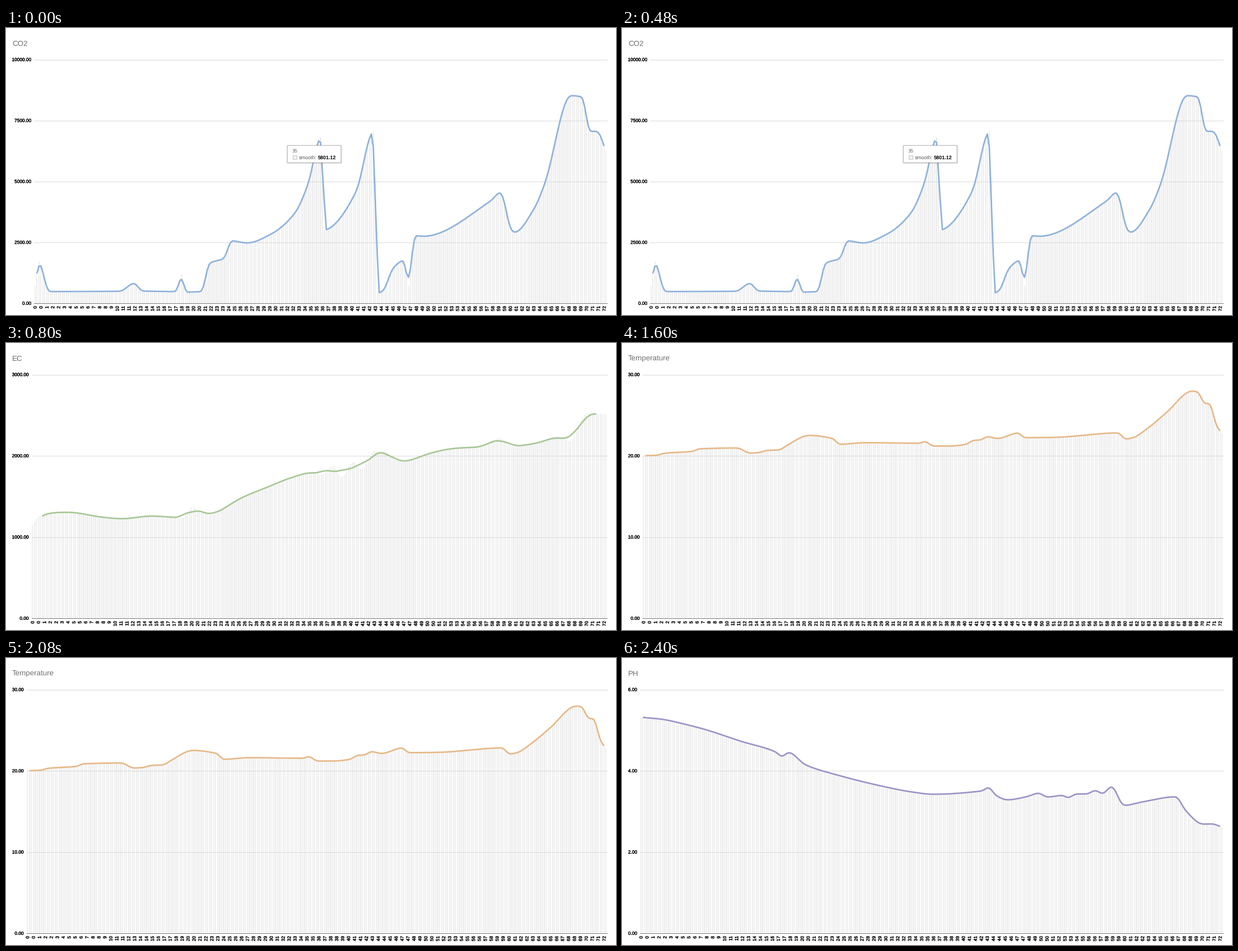
A matplotlib script for the animation above (3200 ms loop, 1089 by 514 pixels).

```python
import numpy as np
import matplotlib.pyplot as plt
from matplotlib.animation import FuncAnimation
from matplotlib.collections import PolyCollection
from matplotlib.patches import FancyBboxPatch, Rectangle
from matplotlib.patheffects import withStroke

W, H, DPI = 1089, 514, 64
PT = 72 / DPI  # points per pixel
TOP, BASE, RIGHT = 56.5, 493, 1073
BARS = 293

plt.rcParams["font.family"] = "Liberation Sans"
plt.rcParams["text.hinting"] = "no_hinting"

# Turning points of each measured series, in stage pixels.
CO2 = [
    (52, 463), (59, 418), (64, 430), (76, 472), (203, 471.5), (229, 457),
    (243, 471), (305, 472), (313, 440), (320, 473), (350, 472), (362, 422),
    (390, 412), (402, 381), (430, 385), (475, 368), (516, 331), (540, 277),
    (561.4, 196), (564.9, 217), (568.4, 362), (577, 359), (625, 293),
    (655.7, 185), (659.2, 265), (662.7, 475), (673, 471), (691, 430),
    (711, 416), (718.5, 461), (729, 372), (745, 373), (865, 310), (883, 294),
    (903, 364), (908, 366), (942, 325), (962, 278), (1008, 121), (1030, 124),
    (1041, 185), (1056, 185), (1071, 221),
]
EC = [
    (47, 325), (58, 311), (80, 304), (122, 303), (150, 309), (212, 315),
    (255, 309.5), (316, 313), (333, 294), (350, 305), (368, 307), (388, 297),
    (418, 278), (447, 266), (545, 232), (600, 228), (640, 216), (660, 196),
    (676, 194), (695, 210), (712, 213), (745, 201), (800, 188.5), (850, 186),
    (882, 170), (902, 185), (960, 176.5), (985, 167), (1007, 175),
    (1034, 129), (1045, 126), (1071, 128),
]
TEMPERATURE = [
    (37, 202), (62, 201), (75, 197.5), (127, 194), (137, 189.5), (206, 188),
    (228, 197), (246, 196), (257, 192.5), (281, 191.5), (291, 185.5),
    (334, 165.5), (378, 171.5), (387, 181.5), (435, 178.5), (532, 179.5),
    (540, 176), (556, 184.5), (585, 184.5), (616, 181), (626, 174.5),
    (641, 173.5), (652, 167.5), (670, 171), (708, 161), (718, 169.5),
    (770, 169), (887, 161), (898, 172), (911, 170), (940, 151.5),
    (972, 124.5), (1018, 86), (1029, 88), (1040, 109), (1050, 108),
    (1060, 146), (1071, 162),
]
PH = [
    (33, 106), (70, 109.5), (110, 118), (150, 128.5), (212, 149), (276, 169),
    (285, 177), (297, 169), (328, 191.5), (386, 210), (453, 227),
    (515, 239.5), (555, 244), (643, 238), (654, 231.5), (668, 246.5),
    (688, 254), (722, 248.5), (744, 242), (759, 249), (787, 246),
    (796, 250.5), (811, 243.5), (830, 243.5), (845, 237), (858, 243),
    (874, 230), (896, 264), (930, 257.5), (989, 248.5), (1006, 273),
    (1037, 297.5), (1053, 297), (1071, 303),
]


def curve(knots, x):
    """Monotone cubic through the knots, held flat beyond both ends."""
    kx, ky = np.array(knots, float).T
    h = np.diff(kx)
    d = np.diff(ky) / h
    a, b = d[:-1], d[1:]
    mid = np.zeros_like(a)
    np.divide(2 * a * b, a + b, out=mid, where=a * b > 0)
    m = np.concatenate([d[:1], mid, d[-1:]])
    x = np.clip(x, kx[0], kx[-1])
    i = np.clip(np.searchsorted(kx, x) - 1, 0, len(h) - 1)
    t = (x - kx[i]) / h[i]
    return (ky[i] * (1 + 2 * t) * (1 - t) ** 2 + m[i] * h[i] * t * (1 - t) ** 2
            + ky[i + 1] * t * t * (3 - 2 * t) + m[i + 1] * h[i] * t * t * (t - 1))


def ripple(x, size):
    """Short burst of sensor swing in the middle of the series."""
    return size * np.cos(2 * np.pi * (x - 600) / 38) * np.exp(-((x - 605) / 45) ** 2)


def label(ax, x, y, text, px, color="black", stroke=0.0, **kw):
    t = ax.text(x, y, text, fontsize=px * PT, color=color, **kw)
    if stroke:
        t.set_path_effects([withStroke(linewidth=stroke * PT, foreground=color)])


def draw_chart(ax, title, left, high, ticks, color, knots, reach, swing):
    label(ax, 11, 31.5, title, 13.4, "#707070")

    for value in np.linspace(0, high, ticks):
        y = BASE + (TOP - BASE) * value / high
        ax.plot([left, RIGHT], [y, y], color="#d9d9d9", lw=PT, zorder=2)
        label(ax, left - 5, y + 2.8, f"{value:.2f}", 8.3, stroke=0.3, ha="right")

    step = (RIGHT - left) / BARS
    x = left + step * (np.arange(BARS) + 0.5)
    tops = curve(knots, x) + ripple(x, swing)
    half = step * 0.31
    bars = [[(c - half, BASE), (c - half, t), (c + half, t), (c + half, BASE)]
            for c, t in zip(x, tops)]
    ax.add_collection(PolyCollection(bars, facecolor="#eeeeee",
                                     edgecolor="none", zorder=1))
    ax.plot([left, RIGHT], [BASE, BASE], color="#7c7c7c", lw=PT, zorder=3)

    # The line is the centred moving average of the bars.
    window = 2 * reach + 1
    mean = np.convolve(tops, np.ones(window) / window, mode="valid")
    ax.plot(x[reach:-reach], mean, color=color, lw=2.7 * PT, zorder=4,
            solid_capstyle="butt", solid_joinstyle="round")

    for k, c in enumerate(x[::3]):
        label(ax, c + 3, 498, str(int(k * 0.7475)), 8.3, stroke=0.3, rotation=90,
              rotation_mode="anchor", ha="right", va="baseline")


def draw_tooltip(ax):
    def box(x, y, w, h, **kw):
        ax.add_patch(FancyBboxPatch(
            (x, y), w, h, boxstyle="round,pad=0,rounding_size=2", **kw))

    for grow in (0.5, 1.2, 2):
        box(502.5 - grow, 211 - grow, 96 + 2 * grow, 30.5 + 2 * grow,
            fc=(0, 0, 0, 0.06), ec="none", zorder=6)
    box(502.5, 210.5, 95.5, 30.5, fc="white", ec="#bdbdbd", lw=PT, zorder=7)
    ax.add_patch(Rectangle((511.5, 227.5), 7.5, 7.5, fc="#efefef",
                           ec="#c4c4c4", lw=PT, zorder=8))
    label(ax, 511, 222.5, "35", 9, "#6e6e6e", zorder=8)
    label(ax, 523, 234.7, "smooth:", 9, "#555555", zorder=8)
    label(ax, 557, 234.7, "5801.12", 9, weight="bold", zorder=8)


CHARTS = [
    ("CO2", 50, 10000, 5, "#8fb2dc", CO2, 1, 0),
    ("EC", 45.5, 3000, 4, "#a8c796", EC, 5, 12),
    ("Temperature", 36.5, 30, 4, "#e6b988", TEMPERATURE, 1, 0),
    ("PH", 32, 6, 4, "#9b94c8", PH, 1, 0),
]

fig = plt.figure(figsize=(W / DPI, H / DPI), dpi=DPI, facecolor="white")
pages = []
for chart in CHARTS:
    ax = fig.add_axes([0, 0, 1, 1])
    draw_chart(ax, *chart)
    ax.set_xlim(0, W)
    ax.set_ylim(H, 0)
    ax.axis("off")
    pages.append(ax)
draw_tooltip(pages[0])


def show_page(i):
    for k, page in enumerate(pages):
        page.set_visible(k == i)
    return pages


anim = FuncAnimation(fig, show_page, frames=len(pages), interval=800,
                     repeat=True, repeat_delay=0, blit=False)
plt.show()
```
